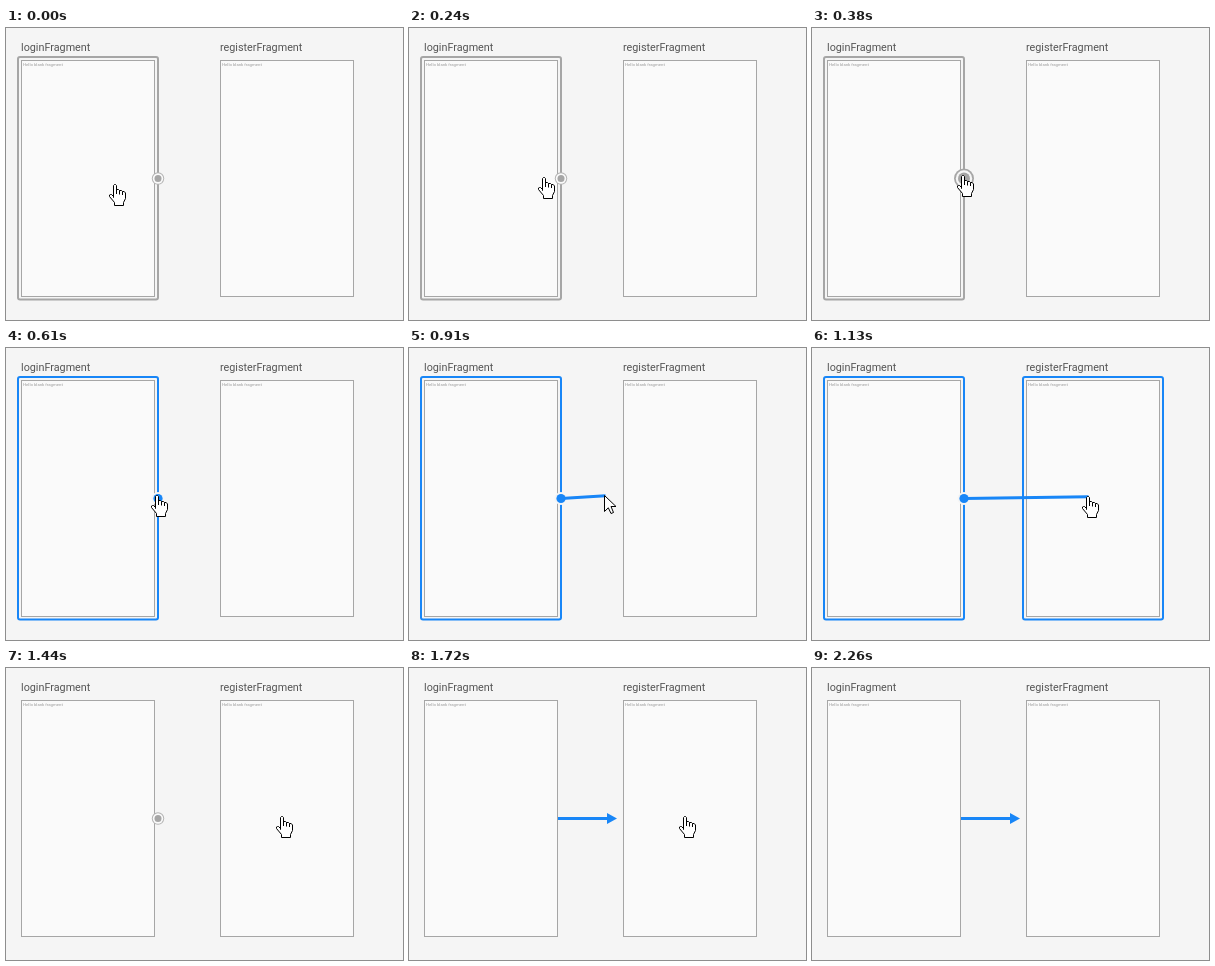
These frames come from a looping animation (397x292 px, 2650 ms). An HTML page with a canvas:

```html
<!DOCTYPE html>
<html lang="en">
<head>
<meta charset="utf-8">
<title>Connecting two fragments</title>
<style>
  html, body { margin: 0; width: 100%; height: 100%; overflow: hidden; background: #f5f5f5; }
  canvas { display: block; }
</style>
</head>
<body>
<canvas id="stage" width="397" height="292"></canvas>
<script>
const ctx = document.getElementById('stage').getContext('2d');
const LOOP = 2650;
const BLUE = '#1886f7', GREY = '#a6a6a6', BACK = '#f5f5f5';
const PORT = { x: 152, y: 150.5 };
const LOGIN = 15, REGISTER = 214;

const HAND = new Path2D('M4.5 13.5V1.5L5.5 .5H6.5L7.5 1.5V5.5H9.5L10.5 6.5H12.5L13.5 7.5H15.2' +
  'L16.5 9V14.5L14.5 18.5V21.5H5.5V18.5L.5 12.5V11L1.5 10.5H2.5L4.5 12.5Z');
const FINGERS = new Path2D('M7.5 5V10M10.5 6.5V10.5M13.5 7.5V11');
const ARROW = new Path2D('M.5 .5V16.5L4.3 12.8L7 18.5L9.5 17.5L7 11.5H12Z');

// Pointer tip: time, x, y
const TRACK = [
  [0, 108, 156], [80, 111, 155], [155, 121, 152], [230, 134, 149], [305, 144, 147], [380, 150, 147],
  [690, 152, 147], [770, 161, 147], [840, 177, 147], [910, 195, 147],
  [970, 224, 148], [1050, 256, 148], [1130, 275, 148], [2180, 278, 154]
];

function disc(r, fill) {
  ctx.fillStyle = fill;
  ctx.beginPath();
  ctx.arc(PORT.x, PORT.y, r, 0, Math.PI * 2);
  ctx.fill();
}

function fragment(x, name) {
  ctx.fillStyle = '#fafafa';
  ctx.fillRect(x, 32, 134, 237);
  ctx.strokeStyle = GREY;
  ctx.lineWidth = 1;
  ctx.strokeRect(x + 0.5, 32.5, 133, 236);
  ctx.fillStyle = '#555';
  ctx.font = '10.8px Roboto, sans-serif';
  ctx.fillText(name, x, 23);
  ctx.fillStyle = '#999';
  ctx.font = '4.3px Roboto, sans-serif';
  ctx.fillText('Hello blank fragment', x + 2, 38);
}

function outline(x, color) {
  ctx.strokeStyle = color;
  ctx.lineWidth = 2;
  ctx.beginPath();
  ctx.roundRect(x - 3, 29, 140, 242.5, 2);
  ctx.stroke();
}

function handle(dragging, hover) {
  if (dragging) {
    disc(6.5, BACK);
    disc(4.6, BLUE);
  } else if (hover) {
    disc(10, GREY);
    disc(8.2, BACK);
    disc(6, GREY);
  } else {
    disc(6.2, '#b4b4b4');
    disc(5.2, '#fafafa');
    disc(3.5, GREY);
  }
}

function line(x, y, width = 3) {
  ctx.strokeStyle = BLUE;
  ctx.lineWidth = width;
  ctx.beginPath();
  ctx.moveTo(PORT.x, PORT.y);
  ctx.lineTo(x, y);
  ctx.stroke();
}

function action() {
  ctx.fillStyle = BLUE;
  ctx.fillRect(149, 149, 50, 3);
  ctx.beginPath();
  ctx.moveTo(198, 145);
  ctx.lineTo(208, 150.5);
  ctx.lineTo(198, 156);
  ctx.fill();
}

function cursor(x, y, hand) {
  ctx.save();
  ctx.translate(hand ? x - 5 : x, y);
  ctx.fillStyle = '#fff';
  ctx.strokeStyle = '#000';
  ctx.lineWidth = 1;
  const shape = hand ? HAND : ARROW;
  ctx.fill(shape);
  ctx.stroke(shape);
  if (hand) ctx.stroke(FINGERS);
  ctx.restore();
}

function draw(t) {
  const [, x, y] = TRACK.findLast(p => p[0] <= t);
  const dragging = t >= 610 && t < 1440;
  const target = dragging && x > 210;

  ctx.fillStyle = BACK;
  ctx.fillRect(0, 0, 397, 292);
  fragment(LOGIN, 'loginFragment');
  fragment(REGISTER, 'registerFragment');

  if (t < 1440) outline(LOGIN, dragging ? BLUE : GREY);
  if (target) outline(REGISTER, BLUE);
  if (t < 1500) handle(dragging, t >= 380 && t < 610);
  if (dragging && t >= 690) line(x + 1.5, y + 0.7);
  if (t >= 1720) action();
  if (t < 2260) cursor(x, y, !dragging || target || x < 158);
}

const start = performance.now();
function tick() {
  draw((performance.now() - start) % LOOP);
  requestAnimationFrame(tick);
}
tick();
</script>
</body>
</html>
```
